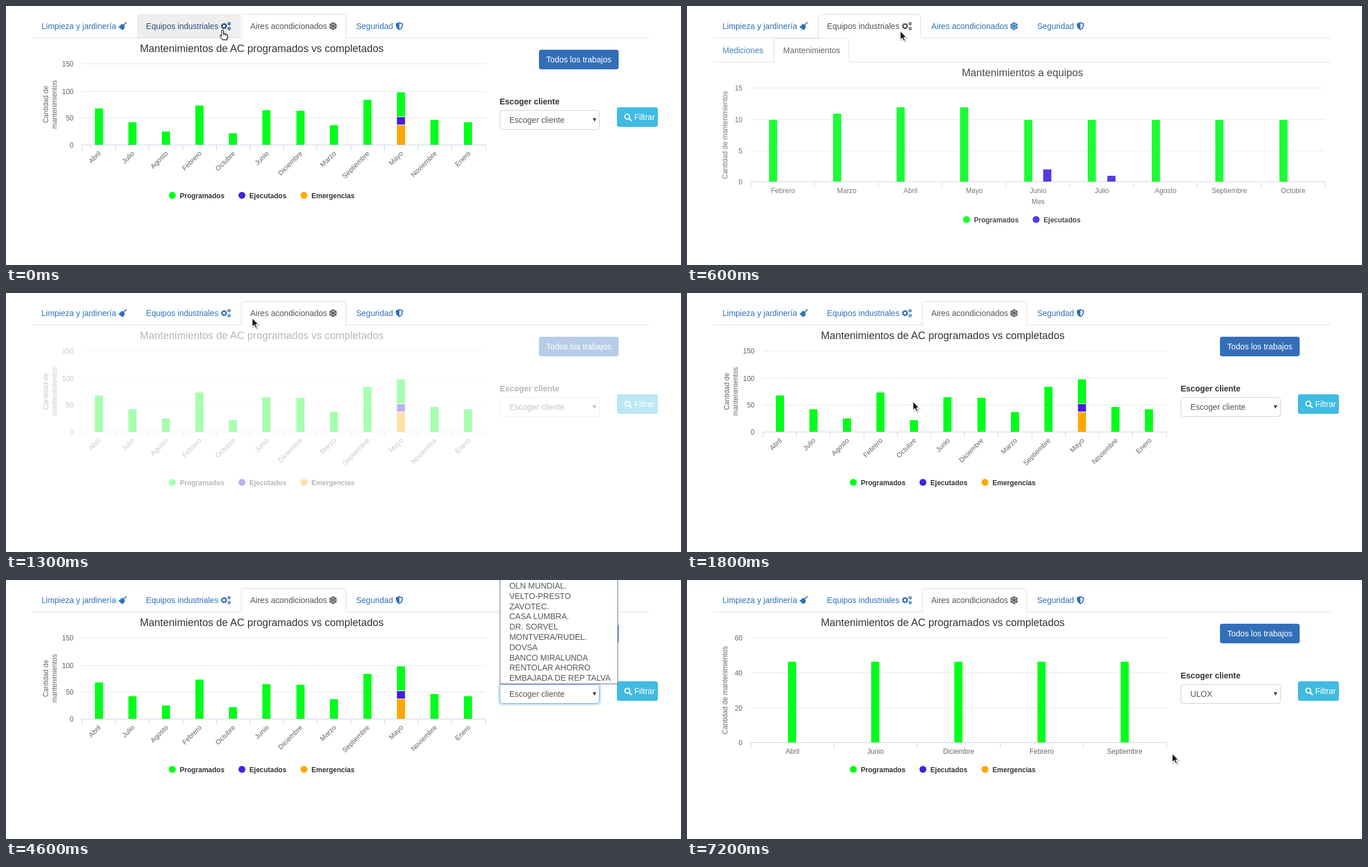
Recreate the animation shown at these times as an HTML page. Size 1169 by 450 pixels, loop 8000 ms.

```html
<!DOCTYPE html>
<html lang="es">
<head>
<meta charset="utf-8">
<style>
html, body { margin: 0; width: 100%; height: 100%; overflow: hidden; background: #fff; }
svg { display: block; font-family: "Liberation Sans", Arial, sans-serif; }
</style>
</head>
<body>
<svg id="stage" width="1169" height="450" viewBox="0 0 1169 450"></svg>
<script>
const stage = document.getElementById('stage');
const LOOP = 8000, STEP = 100;
const GREEN = '#00ff1a', BLUE = '#4520dc', ORANGE = '#ffa800', LINK = '#2f70b7', GRID = '#e6e6e6', AXIS = '#ccd0e8';

const text = (x, y, s, size = 14, fill = '#666', more = '') =>
  `<text x="${x}" y="${y}" font-size="${size}" fill="${fill}" ${more}>${s}</text>`;
const rect = (x, y, w, h, fill, more = '') =>
  `<rect x="${x}" y="${y}" width="${w}" height="${h}" fill="${fill}" ${more}/>`;
const path = (d, fill, more = '') => `<path d="${d}" fill="${fill}" ${more}/>`;
const line = (d, color, w = 1) => path(d, 'none', `stroke="${color}" stroke-width="${w}"`);
const dot = (x, y, r, fill) => `<circle cx="${x}" cy="${y}" r="${r}" fill="${fill}"/>`;
const at = (x, y, s, more = '') => `<g transform="translate(${x} ${y})${more}">${s}</g>`;
const MID = 'text-anchor="middle"', END = 'text-anchor="end"', BOLD = 'font-weight="bold"';

// Tab icons, each centred on 0,0
function gear(x, y, r, w, teeth, c) {
  const len = Math.PI * 2 * (r + w / 2) / teeth / 2;
  return `<g fill="none" stroke="${c}"><circle cx="${x}" cy="${y}" r="${r}" stroke-width="${w}"/>` +
    `<circle cx="${x}" cy="${y}" r="${r + w / 2}" stroke-width="${w * .7}" stroke-dasharray="${len}"/></g>`;
}
const icons = {
  broom: c => path('M7 -7 L7.5 -6 L2.6 -1.2 L4 .4 Q3.5 5 -.5 7 L-2 4.2 L-2.6 6 L-4 4.6 L-3.6 2.6 L-5.4 3.2 L-7 1 Q-3.5 -.2 -2.2 -3.2 L-.6 -4 L1.3 -2.4 L6.3 -7.3 Z', c),
  gears: c => gear(-3, 0, 3.4, 2.4, 8, c) + gear(5.8, -4.2, 1.8, 1.4, 6, c) + gear(5.8, 4.2, 1.8, 1.4, 6, c),
  snow: c => [0, 60, 120].map(a => `<g transform="rotate(${a})">` +
    line('M0 -7 V7 M-2.6 -5.8 L0 -3.4 L2.6 -5.8 M-2.6 5.8 L0 3.4 L2.6 5.8', c, 1.5) + '</g>').join(''),
  shield: c => path('M0 -7 L6.4 -4.4 Q6.6 4 0 7 Q-6.6 4 -6.4 -4.4 Z M0 -5 V4.9 Q4.4 2.4 4.5 -3.2 Z', c, 'fill-rule="evenodd"')
};

const tabs = [
  { id: 'clean', x: 45.5, w: 179, label: 'Limpieza y jardinería', icon: 'broom', ix: 201.8 },
  { id: 'eq', x: 227, w: 178, label: 'Equipos industriales', icon: 'gears', ix: 380.6 },
  { id: 'ac', x: 407, w: 182, label: 'Aires acondicionados', icon: 'snow', ix: 566.4 },
  { id: 'safe', x: 590.5, w: 115, label: 'Seguridad', icon: 'shield', ix: 681.3 }
];

const tabShape = (x, y, w, bottom) =>
  path(`M${x + .5} ${bottom} V${y + 4.5} q0 -4 4 -4 H${x + w - 4.5} q4 0 4 4 V${bottom}`, '#fff', 'stroke="#ddd"');

function tabBar(active, hover) {
  let s = line('M46 55.5 H1114', '#ddd');
  for (const t of tabs) {
    let color = LINK;
    if (t.id === active) {
      s += tabShape(t.x, 14, t.w, 56);
      color = '#555';
    } else if (t.id === hover) {
      s += path(`M${t.x} 55 V18 q0 -4 4 -4 h${t.w - 8} q4 0 4 4 V55 Z`, '#eee');
      color = '#23527c';
    }
    const x = t.id === 'clean' ? 61.5 : t.id === 'eq' ? 242.6 : t.x + 16;
    s += text(x, 40, t.label, 14, color) + at(t.ix, 35, icons[t.icon](color));
  }
  return s;
}

// Grid, value labels, base line and category ticks
function axes(x0, x1, ys, labels, n) {
  const base = ys[ys.length - 1];
  let s = '', ticks = `M${Math.floor(x0)} ${base} H${x1 + .5}`;
  ys.forEach((y, i) => {
    if (y !== base) s += line(`M${Math.floor(x0)} ${y} H${x1}`, GRID);
    s += text(x0 - 14.4, y + 4.7, labels[i], 12, '#666', END);
  });
  for (let i = 0; i <= n; i++) ticks += `M${Math.floor(x0 + (x1 - x0) * i / n) + .5} ${base} v9.5`;
  return s + line(ticks, AXIS);
}
const upright = (x, y, s) => at(x, y, text(0, 0, s, 12, '#666', MID), ' rotate(-90)');
const bar = (x, top, bottom, fill) => rect(Math.round(x), top, 14, bottom - top, fill);
function legend(x, y, n) {
  const items = [['Programados', GREEN, 0], ['Ejecutados', BLUE, 120.6], ['Emergencias', ORANGE, 228]];
  return items.slice(0, n).map(([s, c, dx]) =>
    dot(x + dx, y, 6, c) + text(x + dx + 13, y + 5, s, 12, '#333', BOLD)).join('');
}

const months = ['Abril', 'Julio', 'Agosto', 'Febrero', 'Octubre', 'Junio', 'Diciembre', 'Marzo', 'Septiembre', 'Mayo', 'Noviembre', 'Enero'];
const tops = [178, 202, 218, 173, 221, 181, 182, 207, 163, 150, 198, 202];

function allClients() {
  let s = axes(131.4, 830.04, [100.5, 148.5, 194.5, 241.5], [150, 100, 50, 0], 12) +
    upright(72.5, 171, 'Cantidad de') + upright(87.5, 171, 'mantenimientos');
  months.forEach((m, i) => {
    const x = 153.85 + 58.12 * i;
    if (m === 'Mayo') s += bar(x, 150, 192, GREEN) + bar(x, 193, 206, BLUE) + bar(x, 207, 241, ORANGE);
    else s += bar(x, tops[i], 241, GREEN);
    s += at(165 + 58.2 * i, 257, text(0, 0, m, 12, '#666', END), ' rotate(-45)');
  });
  return s;
}

function oneClient(grown) {
  let s = axes(110.4, 830.04, [100.5, 161.5, 222.5, 282.5], [60, 40, 20, 0], 5) +
    upright(70, 191.5, 'Cantidad de mantenimientos');
  ['Abril', 'Junio', 'Diciembre', 'Febrero', 'Septiembre'].forEach((m, i) => {
    if (grown) s += bar(175 + 144 * i, 142, 282, GREEN);
    s += text(182.8 + 143.8 * i, 302, m, 12, '#666', MID);
  });
  return s;
}

function equipment() {
  let s = line('M46 97.5 H1114', '#ddd') + tabShape(150, 56, 131, 98) +
    text(61.5, 82, 'Mediciones', 14, LINK) + text(166.5, 82, 'Mantenimientos', 14, '#555') +
    text(581, 122, 'Mantenimientos a equipos', 18, '#333', MID) +
    axes(110.4, 1105, [142.5, 197.5, 251.5, 305.5], [15, 10, 5, 0], 9) +
    upright(70, 224, 'Cantidad de mantenimientos');
  ['Febrero', 'Marzo', 'Abril', 'Mayo', 'Junio', 'Julio', 'Agosto', 'Septiembre', 'Octubre'].forEach((m, i) => {
    const top = i === 1 ? 187 : i === 2 || i === 3 ? 176 : 198;
    s += bar(142.2 + 110.42 * i, top, 305, GREEN) + text(166.2 + 110.45 * i, 325, m, 12, '#666', MID);
  });
  return s + bar(617, 284, 305, BLUE) + bar(728, 295, 305, BLUE) +
    text(608, 344, 'Mes', 12, '#666', MID) + legend(484, 371, 2);
}

const clients = ['OLN MUNDIAL.', 'VELTO-PRESTO', 'ZAVOTEC.', 'CASA LUMBRA.', 'DR. SORVEL', 'MONTVERA/RUDEL.',
  'DOVSA', 'BANCO MIRALUNDA', 'RENTOLAR AHORRO', 'EMBAJADA DE REP TALVA'];

function form(chosen, focus, hover) {
  const glow = focus ? rect(853.5, 179.5, 176, 37, 'none', 'rx="6" stroke="#66afe9" stroke-opacity=".3" stroke-width="3"') : '';
  return rect(923, 76, 138, 34, '#336eb9', 'rx="4"') + text(935.6, 98, 'Todos los trabajos', 14, '#fff') +
    text(855, 171, 'Escoger cliente', 14, '#333', BOLD) + glow +
    rect(855.5, 181.5, 172, 33, '#fff', `rx="4" stroke="${focus ? '#66afe9' : '#ccc'}"`) +
    text(871.7, 203, chosen, 14, '#555') + path('M1016 195 h6.4 l-3.2 6 Z', '#444') +
    rect(1058, 176, 71, 34, hover ? '#31b0d5' : '#40bce2', 'rx="4"') +
    `<circle cx="1076" cy="192.3" r="4.2" fill="none" stroke="#fff" stroke-width="2"/>` +
    line('M1079 195.3 L1083.6 199.6', '#fff', 2.5) + text(1088, 198, 'Filtrar', 14, '#fff');
}
const list = () => rect(855.5, -5, 204, 185.5, '#fff', 'stroke="#66668c"') +
  clients.map((c, i) => text(871.7, 15 + 17.8 * i, c, 14, '#555')).join('');

function tooltip(x, y, month, value) {
  const d = 'M3 .5 H119 q3 0 3 3 V41 q0 3 -3 3 H66 l-6 6 l-6 -6 H3.5 q-3 0 -3 -3 V3.5 q0 -3 3 -3 Z';
  const shadow = [5, 3, 1].map(w =>
    path(d, 'none', `transform="translate(1 1)" stroke="#000" stroke-opacity=".06" stroke-width="${w}"`)).join('');
  return at(x, y, shadow + path(d, '#f7f7f7', `fill-opacity=".87" stroke="${GREEN}"`) +
    text(8, 20, month, 10, '#333') + dot(11.7, 31.7, 2.8, GREEN) +
    text(18, 35, `Programados: <tspan ${BOLD}>${value}</tspan>`, 12, '#333'));
}

function pointer(x, y, hand) {
  const d = hand
    ? 'M-1.5 1 Q0 -1 1.5 1 V6 Q3 5 4 6.6 Q5.6 5.8 6.4 7.4 Q8.4 7 8.5 9 V12 L7 16.5 H0 L-4.5 10.5 Q-4.6 8.4 -2.5 9 L-1.5 10 Z'
    : 'M.3 .3 V15.8 L3.8 12.6 L6.4 18 L9 16.8 L6.5 11.6 H11.2 Z';
  const skin = hand ? '#fff' : '#1a1a1a', edge = hand ? '#1a1a1a' : '#fff';
  return at(x, y, path(d, '#000', 'transform="translate(1.3 1.6)" opacity=".22" stroke="#000" stroke-width="1.5"') +
    path(d, skin, `stroke="${edge}" stroke-width="1.1" stroke-linejoin="round"`) +
    (hand ? line('M1.6 5.5 V9 M4.2 7 V9.5 M6.4 8 V10', edge, .9) : ''));
}

// time, x, y
const route = [[0, 375, 42], [100, 369, 42], [200, 369, 42], [300, 369, 43], [600, 369, 43], [900, 426, 43],
  [1400, 426, 43], [1800, 391, 188], [1900, 393, 190], [2400, 574, 216], [5300, 574, 216],
  [5400, 1081, 145], [6200, 1081, 145], [6300, 1090, 194], [7100, 1090, 194], [7200, 840, 301], [LOOP, 840, 301]];
// time, pane, opacity
const fades = [[0, 'ac', 1], [300, 'ac', .7], [400, 'ac', .2], [500, 'eq', .4], [600, 'eq', .89], [700, 'eq', 1],
  [1100, 'eq', .67], [1200, 'eq', .15], [1300, 'ac', .35], [1400, 'ac', .85], [1500, 'ac', 1]];

function place(t) {
  const i = route.findIndex(k => k[0] > t), [t0, x0, y0] = route[i - 1], [t1, x1, y1] = route[i];
  const p = (t - t0) / (t1 - t0);
  return [x0 + (x1 - x0) * p, y0 + (y1 - y0) * p];
}

function acPane(t) {
  const within = (a, b) => t >= a && t < b;
  return text(443, 80, 'Mantenimientos de AC programados vs completados', 18, '#333', MID) +
    (t < 6300 ? allClients() : oneClient(t >= 7200)) + legend(288, 329, 3) +
    form(t < 5100 ? 'Escoger cliente' : 'ULOX', within(4600, 6300), within(6300, 7200)) +
    (within(4600, 5100) ? list() : '') +
    (within(2200, 2400) ? tooltip(446, 131, 'Diciembre', 64) : '') +
    (within(2400, 4600) ? tooltip(504, 157, 'Marzo', 38) : '');
}

function render(t) {
  const within = (a, b) => t >= a && t < b;
  const [, pane, opacity] = fades.filter(f => f[0] <= t).pop();
  const active = within(300, 1100) ? 'eq' : 'ac';
  const hover = t < 300 ? 'eq' : within(800, 1100) ? 'ac' : '';
  const hand = hover || within(6300, 7200);
  stage.innerHTML = tabBar(active, hover) +
    `<g opacity="${opacity}">${pane === 'ac' ? acPane(t) : equipment()}</g>` +
    (within(4600, 5400) ? '' : pointer(...place(t), hand));
}

let shown = -1;
const start = performance.now();
function tick() {
  const t = Math.floor((performance.now() - start) % LOOP / STEP) * STEP;
  if (t !== shown) render(shown = t);
  requestAnimationFrame(tick);
}
tick();
</script>
</body>
</html>
```
